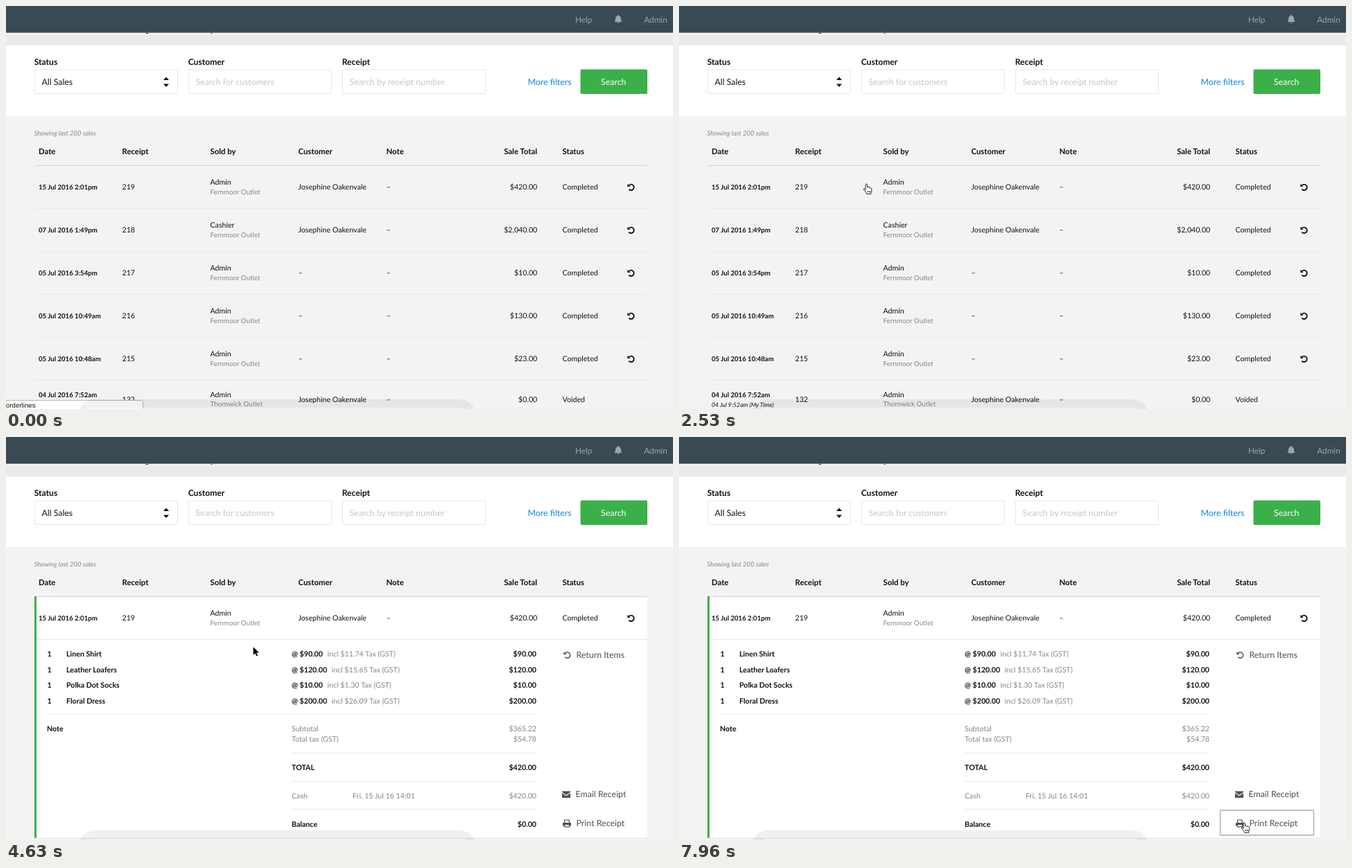
An HTML page for the animation above (8000 ms loop, 962 by 582 pixels).

```html
<!DOCTYPE html>
<html lang="en">
<head>
<meta charset="utf-8">
<title>Sales history</title>
<style>
html, body { margin: 0; width: 100%; height: 100%; overflow: hidden; background: #f3f3f3; }
svg { display: block; width: 100vw; height: 100vh; }
text { font: 10.65px Lato, sans-serif; fill: #111; white-space: pre; text-rendering: geometricPrecision; }
.b { font-weight: 700; }
.i { font-style: italic; }
.r { text-anchor: end; }
.g { fill: #868686; }
.p { fill: #c6c6c6; }
.d { fill: #505050; }
.n { fill: #9ba5ab; }
.l { fill: #0a86e4; }
.w { fill: #fff; }
.s { font-family: "Liberation Sans", Arial, sans-serif; }
</style>
</head>
<body>
<svg viewBox="0 0 962 582">
  <g id="page"></g>
  <g id="cursor">
    <path id="arrow" d="M0 0V11.5L2.7 9 4.5 13.2 6.5 12.4 4.7 8.3H8.3Z" fill="#000" stroke="#fff" stroke-width="1.4" paint-order="stroke"/>
    <path id="hand" d="M-1 6V1.2Q-1 0 .2 0T1.4 1.2V5Q1.5 4 2.6 4.2T3.7 5.4Q4 4.6 5 4.9T5.9 6.2Q6.5 5.6 7.2 6T7.8 7.5V10Q7.6 12 6.6 13V14.6H.6V13.4Q-1.5 11-3.6 8.2Q-4.2 7-3.2 6.7T-1 8.4ZM2 10V12.4M4 10V12.4M5.8 10V12.4" fill="#fff" stroke="#111" stroke-width=".9"/>
  </g>
</svg>
<script>
const LOOP = 8000, STEP = 90;
const OPEN = 3340, LOADED = 3580, PRESSED = 7960, BAR_GONE = 840;
const GREEN = '#3cb048';
const $ = id => document.getElementById(id);

// Pointer path: time, x, y
const path = [
  [570, 15, 134], [660, 15, 134], [1470, 205, 229], [1560, 215, 233],
  [2000, 306, 244], [2360, 268, 256], [2710, 276, 260], [4270, 276, 260],
  [4360, 291, 265], [4420, 291, 265], [4510, 333, 290], [5230, 522, 396],
  [5410, 549, 406], [6110, 689, 473], [6670, 797, 549], [7000, 814, 555.5],
  [7240, 815, 557]
];

const text = (x, y, str, cls = '', size = 10.65) =>
  `<text x="${x}" y="${y}" class="${cls}" style="font-size:${size}px">${str}</text>`;
const rect = (x, y, w, h, fill, more = '') =>
  `<rect x="${x}" y="${y}" width="${w}" height="${h}" fill="${fill}" ${more}/>`;
const line = (x1, x2, y, color = '#e8e8e8') => rect(x1, y, x2 - x1, 1, color);
const shape = (x, y, d, fill) =>
  `<path transform="translate(${x} ${y})" d="${d}" fill="${fill}" fill-rule="evenodd"/>`;

const undo = (x, y, color, width) =>
  `<path transform="translate(${x} ${y})" d="M-3.2 2.8A4.2 4.2 0 1 0-3-2.9" fill="none" stroke="${color}" stroke-width="${width}"/>` +
  shape(x, y, 'M-5.2-5V-.8H-1Z', color);
const mail = (x, y) =>
  shape(x, y, 'M-6-4.8H6V-3.6L0 .8-6-3.6ZM-6-2.2 0 2.2 6-2.2V4.8H-6Z', '#505050');
const printer = (x, y) =>
  shape(x, y, 'M-4-5.5H2.5L4-4V-.8H5Q6-.8 6 .3V3.6H4.2V5.5H-4.2V3.6H-6V.3Q-6-.8-5-.8H-4ZM-2.9-4.4V-.8H2.9V-3.3H1.6V-4.4ZM-3 2.4V4.4H3V2.4Z', '#505050');

function field(x, label, value, cls) {
  return text(x - .3, 85, label, 'b', 12.1) +
    rect(x + .5, 92, 206, 34.5, '#fff', 'stroke="#e6e6e6" rx="1"') +
    text(x + 10.5, 114, value, cls, 12.3);
}

function header() {
  return rect(0, 39, 962, 18, '#ebebeb') + rect(0, 39, 962, 2, '#f6f6f6') +
    rect(202, 38, 3, 2, '#234') + rect(295, 38, 3, 2, '#3c8fcc') +
    rect(0, 0, 962, 38, '#3a4a53') + rect(0, 38, 962, 1, '#7d878d') +
    text(821, 23.5, 'Help', 'n', 11.8) + text(920.2, 23.5, 'Admin', 'n', 11.8) +
    shape(883, 19, 'M0-6Q1-6 1-5Q4-4 4-.5 4 2.5 5.5 4H-5.5Q-4 2.5-4-.5-4-4-1-5-1-6 0-6ZM-1.6 4.6H1.6Q1 6 0 6T-1.6 4.6Z', '#9ba5ab');
}

function filters() {
  return rect(0, 57, 962, 102, '#fff') +
    field(41, 'Status', 'All Sales', '') +
    field(263, 'Customer', 'Search for customers', 'p') +
    field(485, 'Receipt', 'Search by receipt number', 'p') +
    shape(231, 110, 'M-4-3 0-7.5 4-3ZM-4 2.5 0 7 4 2.5Z', '#111') +
    text(752.5, 114, 'More filters', 'l', 12.4) +
    rect(828.5, 91.5, 96.5, 35.5, GREEN, 'rx="2"') +
    text(858, 114, 'Search', 'w', 12.4);
}

function tableHead() {
  const cols = [[47, 'Date'], [167.5, 'Receipt'], [294.5, 'Sold by'], [421.5, 'Customer'], [548.5, 'Note'], [802.5, 'Status']];
  return text(40.5, 187, 'Showing last 200 sales', 'i g', 9.45) +
    cols.map(([x, s]) => text(x, 213.8, s, 'b', 11.35)).join('') +
    text(766, 213.8, 'Sale Total', 'b r', 11.35) +
    line(41, 925, 230, '#d2d2d2');
}

const client = 'Josephine Oakenvale';
const sales = [
  ['15 Jul 2016 2:01pm', 219, 'Admin', client, '$420.00'],
  ['07 Jul 2016 1:49pm', 218, 'Cashier', client, '$2,040.00'],
  ['05 Jul 2016 3:54pm', 217, 'Admin', '–', '$10.00'],
  ['05 Jul 2016 10:49am', 216, 'Admin', '–', '$130.00'],
  ['05 Jul 2016 10:48am', 215, 'Admin', '–', '$23.00'],
  ['04 Jul 2016 7:52am', 132, 'Admin', client, '$0.00']
];

function saleRow([date, receipt, seller, customer, total], top, voided) {
  const y = top + (voided ? 31.5 : 35);
  return text(47, voided ? y - 6.7 : y - .4, date, 'b', 9.65) +
    (voided ? text(47, y + 7.5, '04 Jul 9:52am (My Time)', 'i', 8.7) : '') +
    text(167.5, y, receipt) +
    text(294.5, y - 7, seller) +
    text(294.5, y + 6.6, (voided ? 'Thornwick' : 'Fernmoor') + ' Outlet', 'g', 9.8) +
    text(421.5, y, customer) + text(548.5, y, '–') +
    text(766.3, y, total, 'r') +
    text(802.5, y, voided ? 'Voided' : 'Completed') +
    (voided ? '' : undo(901.5, y - 3.2, '#111', 1.9) + line(41, 925, top + 62));
}

const items = [
  ['Linen Shirt', '90.00', '11.74', 463.5],
  ['Leather Loafers', '120.00', '15.65', 469.5],
  ['Polka Dot Socks', '10.00', '1.30', 463.5],
  ['Floral Dress', '200.00', '26.09', 469.5]
];

function details(loaded, pressed) {
  const a = loaded ? 82 : 0, b = loaded ? 96.5 : 0;
  let out = line(59, 765, 318 + a) + text(59, 343.3 + a, 'Note', 'b') +
    text(412, 343.3 + a, 'Subtotal', 'g') +
    text(412, 357.8 + a, 'Total tax' + (loaded ? ' (GST)' : ''), 'g') +
    line(412, 765, 374 + a) + text(412, 398.7 + a, 'TOTAL', 'b') +
    line(412, 765, 415 + a) + line(412, 765, Math.floor(441 + b)) +
    text(412, 466.3 + b, 'Balance', 'b') +
    undo(809.5, 315, '#505050', 1.5) + text(822.5, 319.2, 'Return Items', 'd', 12.4) +
    mail(808, 419.8 + b) + text(821.5, 423.7 + b, 'Email Receipt', 'd', 12.4);
  if (pressed)
    out += rect(779.5, 538, 137, 38.5, '#ddd', 'rx="3"') +
      rect(780.7, 539, 134.6, 36, '#fff', 'rx="2" stroke="#b5b5b5" stroke-width="1.4"');
  out += printer(809, 461.4 + b) + text(822.5, 465.5 + b, 'Print Receipt', 'd', 12.4);
  if (!loaded) return out;
  items.forEach(([name, price, tax, x], i) => {
    const y = 317 + i * 22.5;
    out += text(59.5, y, 1, 'b') + text(87, y, name, 'b') +
      text(412, y, '@ $' + price, 'b') + text(x, y, `incl $${tax} Tax (GST)`, 'g') +
      text(765, y, '$' + price, 'b r');
  });
  return out + text(765, 425.3, '$365.22', 'g r') + text(765, 439.8, '$54.78', 'g r') +
    text(765, 480.7, '$420.00', 'b r') +
    text(412, 521.8, 'Cash', 'g') + text(500, 521.8, 'Fri, 15 Jul 16 14:01', 'g') +
    text(765, 521.8, '$420.00', 'g r') + text(765, 562.8, '$0.00', 'b r');
}

function drawPage({ open, loaded, hover, pressed, bar }) {
  const end = loaded ? 579 : 482.5;
  const shift = open ? end - 292 : 0;
  let out = rect(0, 0, 962, 582, '#f3f3f3') + header() + filters() + tableHead();
  if (open)
    out += rect(41, 231, 884, end - 231, '#fff') +
      (hover ? rect(41, 231, 884, 61, '#e7f0f8') : '') +
      rect(41, 230, 3, end - 230, GREEN) + line(44, 925, Math.floor(end), '#e6e6e6');
  sales.forEach((sale, i) => out += saleRow(sale, 230 + i * 62 + (i && shift), i == 5));
  if (open) out += rect(41, 291, 3, 3, GREEN) + details(loaded, pressed);
  if (bar)
    out += rect(-3, 569.5, 200.5, 20, '#fff', 'stroke="#b8b8b8" rx="2"') +
      text(0, 579.5, 'orderlines', 's', 9.7);
  return out + rect(105, 568, 572, 50, 'rgba(0,0,0,.055)', 'rx="22"') +
    rect(118, 580, 546, 30, 'rgba(255,255,255,.5)', 'rx="6"');
}

// The pointer moves in short jumps counted from the last key
function pointer(t) {
  const i = path.findLastIndex(k => k[0] <= t);
  const [t0, x0, y0] = path[i];
  const [t1, x1, y1] = path[Math.min(i + 1, path.length - 1)];
  const passed = Math.floor((t - t0) / STEP) * STEP;
  const u = t1 > t0 ? passed / (t1 - t0) : 0;
  return [x0 + (x1 - x0) * u, y0 + (y1 - y0) * u];
}

let shown = '';
function frame() {
  const t = performance.now() % LOOP;
  const visible = t >= path[0][0];
  const [x, y] = visible ? pointer(t) : [0, 0];
  const hover = y > 230 && y < 292;
  const hand = hover || (x > 779 && y > 495);
  const state = { open: t >= OPEN, loaded: t >= LOADED, hover, pressed: t >= PRESSED, bar: t < BAR_GONE };
  const key = JSON.stringify(state);
  if (key != shown) {
    shown = key;
    $('page').innerHTML = drawPage(state);
  }
  $('cursor').setAttribute('visibility', visible ? 'visible' : 'hidden');
  $('cursor').setAttribute('transform', `translate(${x} ${y})`);
  $('arrow').style.display = hand ? 'none' : '';
  $('hand').style.display = hand ? '' : 'none';
  requestAnimationFrame(frame);
}
frame();
</script>
</body>
</html>
```
